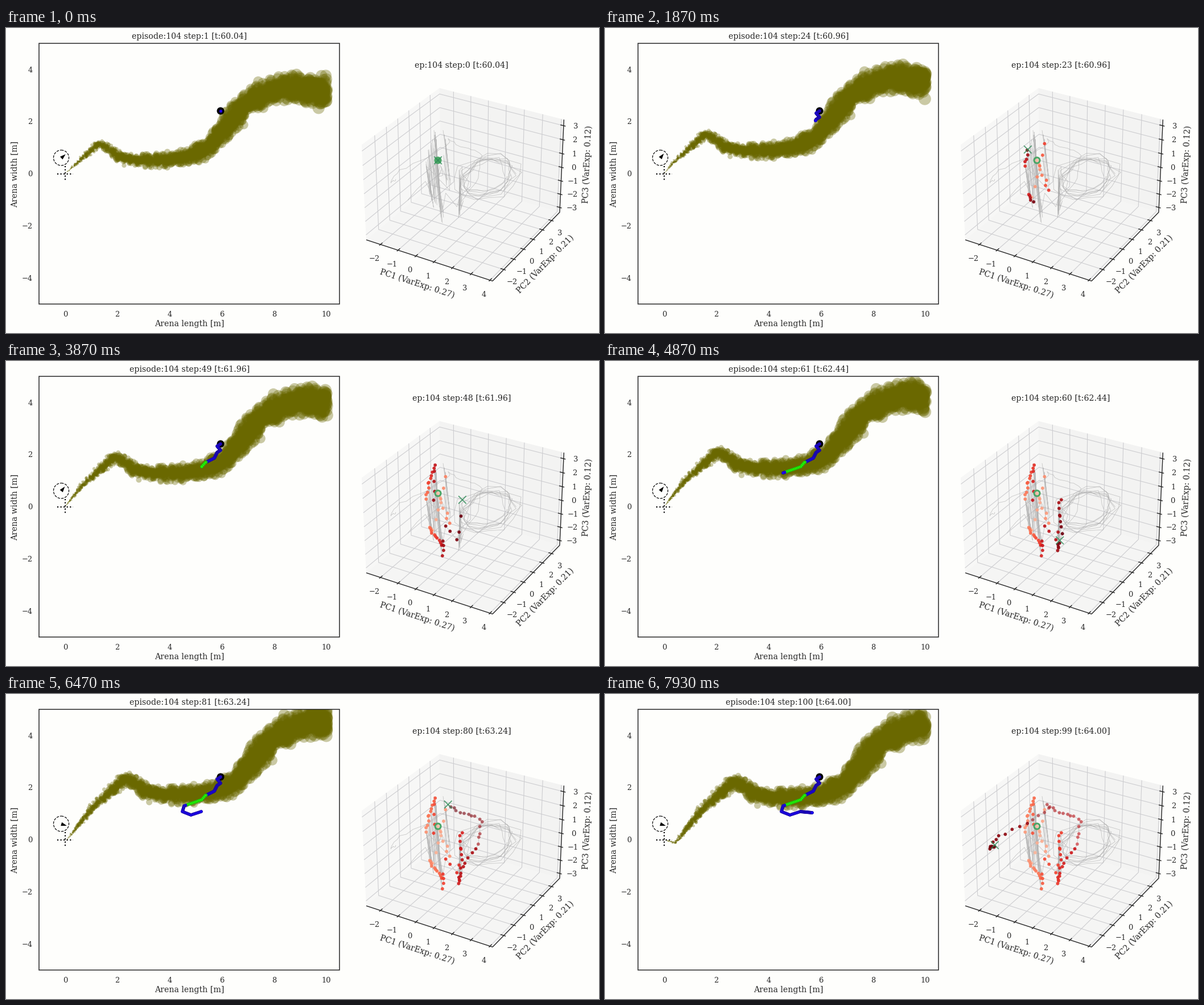
A matplotlib script that plays this animation: 1042x537 px, repeating every 8000 ms.

```python
import matplotlib.pyplot as plt
import numpy as np
from matplotlib.animation import FuncAnimation
from matplotlib.collections import LineCollection
from matplotlib.patches import Circle, Polygon, Rectangle

W, H, DPI = 1042, 537, 64
PT = 72 / DPI                      # points per pixel
STEPS, LOOP_MS = 100, 8000
INK = "#262626"
LABEL, TICK = 14.15, 12.95         # font sizes in pixels

plt.rcParams["font.family"] = "DejaVu Serif"
rng = np.random.default_rng(104)
steps = np.arange(STEPS)

fig = plt.figure(figsize=(W / DPI, H / DPI), dpi=DPI, facecolor="#fefefc")
ax = fig.add_axes([0, 0, 1, 1])
ax.set(xlim=(0, W), ylim=(H, 0))
ax.axis("off")


def label(x, y, text, size=LABEL, **kw):
    kw = {"ha": "center", "va": "baseline", **kw}
    return ax.text(x, y, text, fontsize=size * PT, color=INK, **kw)


def num(v):
    return str(v).replace("-", "\u2212")


def lines(segments, color, width, **kw):
    ax.add_collection(LineCollection(segments, colors=color, linewidths=width * PT, **kw))


def dots(radius, **kw):
    return ax.scatter([], [], s=(2 * radius * PT) ** 2, **kw)


def interp2(t, knots, points):
    """Piecewise linear path through 2D points."""
    points = np.asarray(points, float)
    return np.column_stack([np.interp(t, knots, points[:, i]) for i in (0, 1)])


# ---------- arena ----------
LEFT, TOP, RIGHT, BOTTOM = 58, 27, 586, 486
UNIT = (RIGHT - LEFT) / 11.5
SOURCE = np.array([LEFT + UNIT, (TOP + BOTTOM) / 2])

frame_box = Rectangle((LEFT, TOP), RIGHT - LEFT, BOTTOM - TOP, fill=False,
                      ec=INK, lw=1.5 * PT, zorder=5)
ax.add_patch(frame_box)
for v in range(0, 11, 2):
    label(SOURCE[0] + v * UNIT, 507.5, num(v), TICK)
for v in range(-4, 5, 2):
    label(46.8, SOURCE[1] - v * UNIT + 4.7, num(v), TICK, ha="right")
label(322.5, 525, "Arena length [m]")
label(15.2, 257, "Arena width [m]", rotation=90, va="center")
arena_title = label(322.5, 19.5, "")

# ---------- wind and plume ----------
SPEED, TURN = 0.93, 77
heading = np.radians(np.where(steps < TURN, 51.5, -17))
stride = SPEED * np.column_stack([np.cos(heading), -np.sin(heading)])
drift = np.vstack([[0, 0], np.cumsum(stride, axis=0)])[:STEPS]


def centre_line(x):
    """Height of the plume at the start: a straight leg, a dip and a rise."""
    leg = SOURCE[1] - 0.9 * (x - SOURCE[0])
    rise = 234 - 130 / (1 + np.exp((392 - x) / 26))
    bump = 29 * np.exp(-((x - 162) / 33) ** 2)
    sag = (np.clip(x - 490, 0, None) / 25) ** 2
    return np.where(x < 162, leg, rise - bump + sag)


PER_PX = 4
line_x = np.linspace(SOURCE[0], 590, 400)
line = np.column_stack([line_x, centre_line(line_x)])
arc = np.r_[0, np.cumsum(np.hypot(*np.diff(line, axis=0).T))]
old_age = rng.uniform(0, arc[-1], int(PER_PX * arc[-1]))
birth = rng.uniform(0, STEPS - 1, int(PER_PX * SPEED * STEPS))

home = np.vstack([interp2(old_age, arc, line), SOURCE - interp2(birth, steps, drift)])
age0 = np.r_[old_age, -SPEED * birth]
offset = np.clip(rng.normal(size=(len(home), 2)), -2.4, 2.4)

plume = ax.scatter([], [], color="#6a6800", alpha=0.35, linewidths=0, zorder=2)
plume.set_clip_path(frame_box)


def puffs(k):
    age = age0 + SPEED * k
    live = age > 0
    age = age[live]
    pos = home[live] + drift[k] + 0.12 * age[:, None] ** 0.72 * offset[live]
    keep = pos[:, 0] < 564
    return pos[keep], 0.13 * age[keep] ** 0.7


# source cross and wind dial
sx, sy = SOURCE
lines([[(sx - 13.8, sy), (sx + 13.8, sy)], [(sx, sy - 13.8), (sx, sy + 13.8)]],
      "black", 2.1, linestyles=":", zorder=3)
ax.add_patch(Circle((97, 228.5), 13.5, fill=False, ec="black", lw=1.2 * PT, ls="--", zorder=3))
needle = ax.add_patch(Polygon([(0, 0), (1, 0), (0, 1)], fc="black", lw=0, zorder=3))


def needle_points(k):
    a = np.radians(np.interp(k, [0, 6, TURN - 3, TURN + 2], [42, 52, 52, -17]))
    ahead = np.array([np.cos(a), -np.sin(a)])
    side = ahead[::-1] * [-1, 1]
    base = np.array([97.2, 229.0])
    return [base + 10 * ahead, base + 3.3 * side, base - 3.3 * side]


# ---------- walker ----------
walk = interp2(steps, [0, 6, 12, 20, 34, 45, 48, 60, 66, 73, 80, 99],
               [(377, 146), (371, 150), (377, 157), (371, 161), (366, 171), (350, 179),
                (344, 186), (313, 197), (310, 207), (325, 213), (343, 207), (364, 209)])
inside = (steps >= 44) & (steps <= 58)
walk_face = np.where(inside, "#22ff00", "#1c00ff")
walk_edge = np.where(inside, "#1fae10", "#1a0a9c")

ax.add_patch(Circle(walk[0], 6.5, fc="black", lw=0, zorder=3))
trail = dots(2.5, linewidths=0.8 * PT, zorder=4)

# ---------- component space ----------
# standard view: elevation 30, azimuth -60, box 4:4:3, distance 10
elev, azim = np.radians([30, -60])
view = np.array([np.cos(elev) * np.cos(azim), np.cos(elev) * np.sin(azim), np.sin(elev)])
right = np.array([-np.sin(azim), np.cos(azim), 0])
half = 0.1488 * np.array([4, 4, 3])
AXES = np.array([right, np.cross(view, right), view]) * half


def project(*p):
    """Perspective view of a point in the cube [-1, 1]^3, in pixels."""
    x, y, near = AXES @ np.array(p)
    zoom = 2136 / (10 - near)
    return 806.1 + zoom * x, 267.5 - zoom * y


def polyline(*pts):
    return [project(*p) for p in pts]


pc1 = {v: -0.764 + 0.2875 * (v + 2) for v in range(-2, 5)}
pc2 = {v: -0.69 + 0.286 * (v + 2) for v in range(-2, 4)}
pc3 = {v: -0.009 + 0.2943 * v for v in range(-3, 4)}

walls = [("#f7f7f6", [(-1, -1, -1), (-1, 1, -1), (-1, 1, 1), (-1, -1, 1)]),
         ("#f3f3f2", [(-1, 1, -1), (1, 1, -1), (1, 1, 1), (-1, 1, 1)]),
         ("#f5f5f4", [(-1, -1, -1), (1, -1, -1), (1, 1, -1), (-1, 1, -1)])]
for tone, corners in walls:
    ax.add_patch(Polygon(polyline(*corners), fc=tone, lw=0, zorder=0))

grid = [polyline((t, 1, 1), (t, 1, -1), (t, -1, -1)) for t in pc1.values()]
grid += [polyline((-1, t, 1), (-1, t, -1), (1, t, -1)) for t in pc2.values()]
grid += [polyline((-1, -1, t), (-1, 1, t), (1, 1, t)) for t in pc3.values()]
lines(grid, "#cdcdd0", 1.1, zorder=1)

IN, OUT = 0.95, 1.03
ticks = [polyline((t, -IN, -1), (t, -OUT, -1)) for t in pc1.values()]
ticks += [polyline((IN, t, -1), (OUT, t, -1)) for t in pc2.values()]
ticks += [polyline((IN, 1, t), (OUT, 1, t)) for t in pc3.values()]
edges = [polyline((-1, -1, -1), (1, -1, -1), (1, 1, -1), (1, 1, 1))]
lines(edges + ticks, INK, 1.4, zorder=2)


def tick_labels(marks, place, dx, dy):
    for v, t in marks.items():
        x, y = project(*place(t))
        label(x + dx, y + dy + 4.7, num(v), TICK)


tick_labels(pc1, lambda t: (t, -1, -1), -10.5, 24)
tick_labels(pc2, lambda t: (1, t, -1), 14, 21)
tick_labels(pc3, lambda t: (1, 1, t), 21, 0)
for n, share, x, y, angle in [(1, "0.27", 722, 450.5, -18), (2, "0.21", 947.5, 416, 45.7),
                              (3, "0.12", 1021.5, 240, 87.5)]:
    label(x, y, f"PC{n} (VarExp: {share})", rotation=angle, va="center")
space_title = label(800.5, 70, "")


def along(n, points):
    return interp2(np.linspace(0, 1, n), np.linspace(0, 1, len(points)), points)


def swing(n, high, low):
    """Alternate between two drifting levels."""
    return np.where(np.arange(n)[:, None] % 2, along(n, low), along(n, high))


state = np.vstack([
    swing(13, [(759, 233), (781, 287)], [(749, 307), (776, 196)]),
    swing(22, [(737, 242), (753, 180)], [(743, 290), (767, 326)]),
    swing(8, [(751, 195), (757, 252)], [(769, 348), (768, 315)]),
    along(6, [(772, 290), (796, 318), (802, 242)]),
    swing(12, [(796, 250), (805, 308)], [(795, 335), (798, 317)]),
    along(20, [(800, 306), (830, 264), (836, 222), (803, 209), (776, 197)]),
    along(12, [(780, 201), (748, 226), (697, 247), (678, 268)]),
    along(7, [(676, 272), (685, 267)]),
])
state[1:] += rng.normal(0, 1.2, (STEPS - 1, 2))

# faint paths of the whole episode
ghosts = [state]
for _ in range(8):
    a = np.linspace(0, 2 * np.pi, 15) + rng.uniform(0, 1)
    size = rng.uniform(0.6, 1.05) + rng.normal(0, 0.08, a.size)
    ghosts.append(np.column_stack([846 + 58 * size * np.cos(a),
                                   262 + size * (42 * np.sin(a) - 12 * np.cos(a))]))
for x, top, bottom, lean in [(752, 180, 345, 14), (738, 240, 320, 14),
                             (768, 180, 280, 14), (796, 250, 334, 2)]:
    ghosts.append(swing(6, [(x, top), (x + 5, top + 20)],
                        [(x + lean, bottom), (x + lean - 3, bottom - 20)]))
ghosts.append([(706, 303), (722, 284), (737, 270), (752, 300)])
lines(ghosts, "#a6a6a6", 0.8, alpha=0.6, zorder=2)

faded = (steps >= 66) & (steps <= 84)
reds = plt.get_cmap("Reds")
memory = dots(2.9, linewidths=0, zorder=3)
start = ax.add_patch(Circle(state[0], 5, fc="none", ec="#4aa565", lw=3 * PT, zorder=4))
cross = LineCollection([], colors="#2e8b57", linewidths=1.8 * PT, alpha=0.8, zorder=4)
ax.add_collection(cross)


def draw(k):
    clock = f"[t:{60.04 + 0.04 * k:.2f}]"
    arena_title.set_text(f"episode:104 step:{k + 1} {clock}")
    space_title.set_text(f"ep:104 step:{k} {clock}")

    pos, radius = puffs(k)
    plume.set_offsets(pos)
    plume.set_sizes((2 * radius * PT) ** 2)
    needle.set_xy(needle_points(k))

    trail.set_offsets(walk[:k + 1])
    trail.set_facecolor(walk_face[:k + 1])
    trail.set_edgecolor(walk_edge[:k + 1])

    shade = reds(0.25 + 0.75 * steps[:k] / max(k, 1))
    shade[:, 3] = np.where(faded[:k], 0.6, 0.92)
    memory.set_offsets(state[:k])
    memory.set_facecolor(shade)

    start.set_facecolor("#4aa565" if k == 0 else "none")
    x, y = state[k]
    r = 6.8
    cross.set_segments([[(x - r, y - r), (x + r, y + r)], [(x - r, y + r), (x + r, y - r)]])
    return arena_title, space_title, plume, needle, trail, memory, start, cross


anim = FuncAnimation(fig, draw, frames=STEPS, interval=LOOP_MS / STEPS,
                     repeat=True, repeat_delay=0, blit=False)
plt.show()
```
